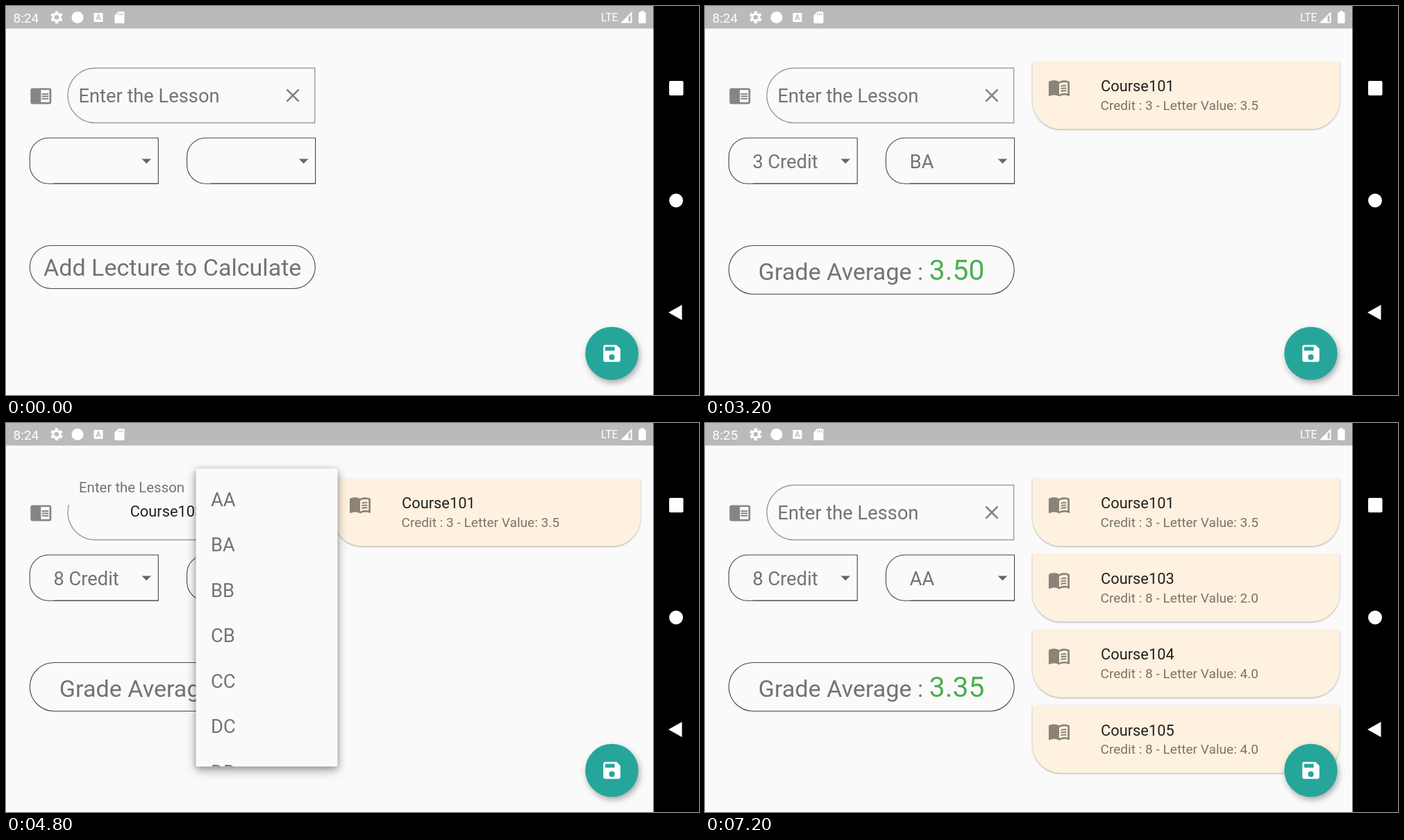
An HTML page for the animation above (8 s loop, 998x561 px).

```html
<!DOCTYPE html>
<html lang="en">
<head>
<meta charset="utf-8">
<title>Grade calculator</title>
<style>
html, body { margin: 0; width: 100%; height: 100%; overflow: hidden; background: #fafafa; }
svg { display: block; width: 998px; height: 561px; font-family: Roboto, sans-serif; }
.card { filter: drop-shadow(0 1px 1.2px rgba(0,0,0,.32)); }
.fab { filter: drop-shadow(2px 4px 4px rgba(0,0,0,.32)); }
.menu { filter: drop-shadow(0 1px 3px rgba(0,0,0,.2)) drop-shadow(0 5px 7px rgba(0,0,0,.36)); }
.key { filter: drop-shadow(0 1px 0.5px rgba(0,0,0,.3)); }
</style>
</head>
<body>
<svg id="stage" viewBox="0 0 998 561"></svg>
<script>
const STEP = 800;
const GREY = '#737373', DARK = '#212121', RED = '#d32f2f', ORANGE = '#ffa726', SLATE = '#55585d';
const DP = 1.364;

const course = (n, credit, value) => ({ title: 'Course' + n, credit, value });
const courses = [course(101, 3, '3.5'), course(103, 8, '2.0'), course(104, 8, '4.0'), course(105, 8, '4.0')];
const letters = ['AA', 'BA', 'BB', 'CB', 'CC', 'DC', 'DD'];
const credits = [1, 2, 3, 4, 5, 6, 7].map(n => n + ' Credit');

const scenes = [
  {},
  { fieldError: true, creditError: true, letterError: true },
  { name: 'Course101', creditError: true, letterError: true },
  { name: 'Course101', credit: 3, letterError: true },
  { credit: 3, letter: 'BA', cards: 1, average: '3.50' },
  { name: 'Course103', credit: 3, letter: 'BA', cards: 1, average: '3.50', menu: [47, 92.5, credits] },
  { name: 'Course103', credit: 8, letter: 'BA', cards: 1, average: '3.50', menu: [273.5, 110, letters] },
  { credit: 8, letter: 'AA', cards: 3, average: '3.08', late: true },
  { name: 'Physics', credit: 8, letter: 'AA', cards: 3, average: '3.08', late: true, typing: true },
  { credit: 8, letter: 'AA', cards: 4, average: '3.35', late: true }
];

const icons = {
  reader: 'M13 12h7v1.5h-7zm0-2.5h7V11h-7zm0 5h7V16h-7zM21 4H3c-1.1 0-2 .9-2 2v13c0 1.1.9 2 2 2h18c1.1 0 2-.9 2-2V6c0-1.1-.9-2-2-2zm0 15h-9V6h9v13z',
  book: 'M21 5c-1.1-.35-2.3-.5-3.5-.5-1.95 0-4.05.4-5.5 1.5-1.45-1.1-3.55-1.5-5.5-1.5S2.45 4.9 1 6v14.65c0 .3.4.6.75.45C3.1 20.45 5.05 20 6.5 20c1.95 0 4.05.4 5.5 1.5 1.35-.85 3.8-1.5 5.5-1.5 1.65 0 3.35.3 4.75 1.05.35.15.75-.15.75-.45V6c-.6-.45-1.25-.75-2-1zm0 13.5c-1.1-.35-2.3-.5-3.5-.5-1.7 0-4.15.65-5.5 1.5V8c1.35-.85 3.8-1.5 5.5-1.5 1.2 0 2.4.15 3.5.5zM13.8 9.9q3-1 5.8-.5v1.5q-3-.5-5.8.5zm0 2.7q3-1 5.8-.5v1.5q-3-.5-5.8.5zm0 2.7q3-1 5.8-.5v1.5q-3-.5-5.8.5z',
  save: 'M17 3H5c-1.1 0-2 .9-2 2v14c0 1.1.9 2 2 2h14c1.1 0 2-.9 2-2V7zm-5 16a3 3 0 1 1 0-6 3 3 0 0 1 0 6zm3-10H5V5h10z',
  close: 'M19 6.4L17.6 5 12 10.6 6.4 5 5 6.4l5.6 5.6L5 17.6 6.4 19l5.6-5.6 5.6 5.6 1.4-1.4-5.6-5.6z',
  arrow: 'M7 9.5l5 5 5-5z',
  mic: 'M12 14c1.66 0 3-1.34 3-3V5a3 3 0 0 0-6 0v6c0 1.66 1.34 3 3 3zm5-3a5 5 0 0 1-10 0H5c0 3.5 2.6 6.4 6 6.9V21h2v-3.1c3.4-.5 6-3.4 6-6.9z',
  palette: 'M12 2a10 10 0 0 0 0 20c1.4 0 2.5-1.1 2.5-2.5 0-.6-.2-1.2-.6-1.7-.3-.4 0-.8.4-.8H16c3.3 0 6-2.7 6-6 0-5-4.5-9-10-9z' +
    [[6.5, 12], [9.5, 8], [14.5, 8], [17.5, 12]].map(([x, y]) => `M${x - 1.5} ${y}a1.5 1.5 0 0 0 3 0a1.5 1.5 0 0 0-3 0z`).join('')
};

// Icons are drawn on a 24-unit grid centred on (x, y).
const icon = (name, x, y, fill, scale = DP) =>
  `<path d="${icons[name]}" fill="${fill}" fill-rule="evenodd" transform="translate(${x} ${y}) scale(${scale}) translate(-12 -12)"/>`;
const text = (x, y, size, fill, s, more = '') => `<text x="${x}" y="${y}" font-size="${size}" fill="${fill}" ${more}>${s}</text>`;
const mid = (x, y, size, fill, s, more = '') => text(x, y, size, fill, s, 'text-anchor="middle" ' + more);
const line = (d, stroke, width = 1, more = '') => `<path d="${d}" fill="none" stroke="${stroke}" stroke-width="${width}" ${more}/>`;
const rect = (x, y, w, h, fill, r = 0, more = '') => `<rect x="${x}" y="${y}" width="${w}" height="${h}" fill="${fill}" rx="${r}" ${more}/>`;
const circle = (x, y, r, fill, more = '') => `<circle cx="${x}" cy="${y}" r="${r}" fill="${fill}" ${more}/>`;
const gear = (x, y, fill, k) => `<g transform="translate(${x} ${y}) scale(${k})" fill="none" stroke="${fill}">
  <circle r="5.3" stroke-width="3.6"/><circle r="8" stroke-width="3.4" pathLength="12" stroke-dasharray="1.15 .85" stroke-dashoffset="-.42"/></g>`;

function statusBar(late) {
  return rect(0, 0, 933, 32.5, '#bababa') + text(10.5, 23.8, 19.1, '#fff', late ? '8:25' : '8:24') +
    gear(73, 16.3, '#fff', .92) + circle(103, 16.5, 8.5, '#fff') +
    rect(126.5, 10, 13, 13, '#fff', 1) + mid(133, 20.4, 10.5, '#bababa', 'A', 'font-weight="700"') +
    '<path d="M162 8h7q1.5 0 1.5 1.500v14q0 1.500-1.500 1.500h-11q-1.500 0-1.500-1.500V13.500z" fill="#fff"/>' +
    line('M162.300 10.500v3M165 10.500v3M167.700 10.500v3', '#bababa', 1.2) +
    text(857, 22, 15.6, '#fff', 'LTE') +
    '<path d="M885 24.500L901.500 8v16.500zM896.500 15.500v7h3v-10z" fill="#fff" fill-rule="evenodd"/>' +
    rect(911, 9, 10.5, 16, '#fff', 1.5) + rect(914, 7, 4.5, 3, '#fff');
}

function navBar(typing) {
  let out = rect(932.5, 0, 65.5, 561, '#000') + rect(955, 108, 20.5, 21, '#fff', 2) + circle(965, 280.5, 10, '#fff');
  if (!typing) return out + '<path d="M954 442l19.500-11v22z" fill="#fff"/>';
  out += '<path d="M954 434h22l-11 19.500z" fill="#fff"/>';
  for (const y of [33, 37]) out += line(`M955 ${y}h21`, '#fff', 2.2, 'stroke-dasharray="2.2 1.5"');
  return out + line('M959 42.500h13', '#fff', 2.2);
}

function field({ name, typing, fieldError }) {
  const accent = typing ? ORANGE : fieldError ? RED : '#9b9b9b';
  const mark = typing ? ORANGE : '#858585';
  const shape = name ? 'M90.600 118A39.500 39.500 0 0 0 128.500 168.500H444.700V89.500H292'
    : 'M444.700 89.500H128.500a39.500 39.500 0 0 0 0 79H444.700z';
  let out = line(shape, accent, typing ? 2.7 : 1.4) + icon('reader', 50.3, 129.3, mark) + icon('close', 413, 129, mark);
  out += name ? text(105, 100.3, 20.46, GREY, 'Enter the Lesson') + mid(231.5 + (typing ? 2 : 0), 135.3, 21.83, typing ? '#666' : DARK, name)
    : text(104.5, 139, 27.28, GREY, 'Enter the Lesson');
  if (typing) out += rect(232, 118, 3, 20.5, '#4b8df0', 1);
  if (fieldError) out += text(105, 195.500, 16.37, RED, 'Enter lesson');
  return out;
}

function dropdown(x, y, value, error) {
  const h = error ? 96 : 66;
  let out = line(`M${x + 185} ${y}H${x + 27}a27 27 0 0 0 -27 27v${h - 54}a27 27 0 0 0 27 27H${x + 185}z`, '#474747', 1.1) +
    line(`M${x + 34.500} ${y + 65.700}H${x + 185}`, error ? RED : '#555', error ? 1.5 : 1.2) +
    icon('arrow', x + 168, y + 33.500, '#666');
  if (value) out += text(x + 34.2, y + 43.4, 27.28, GREY, value);
  if (error) out += text(x + 34.2, y + 91.6, 16.37, RED, error);
  return out;
}

function form(s) {
  const top = 190.3 + (s.fieldError ? 30 : 0);
  const tall = s.creditError || s.letterError;
  const inset = error => tall && !error ? 15 : 0;
  const y = 345.5 + (s.fieldError ? 30 : 0) + (tall ? 30 : 0);
  const h = s.average ? 70 : 62;
  return field(s) +
    dropdown(34.3, top + inset(s.creditError), s.credit && s.credit + ' Credit', s.creditError && 'Select credit') +
    dropdown(260.6, top + inset(s.letterError), s.letter, s.letterError && 'Select letter') +
    rect(34.3, y, 411, h, 'none', h / 2, 'stroke="#474747" stroke-width="1.1"') +
    (s.average
      ? mid(239.7, y + 49.5, 34.1, GREY, `Grade Average : <tspan font-size="40.9" fill="#4caf50">${s.average}</tspan>`)
      : mid(239.7, y + 43, 34.1, GREY, 'Add Lecture to Calculate'));
}

function card({ title, credit, value }, i) {
  return `<g transform="translate(0 ${i * 109.100})">
    <path class="card" d="M471.500 80H914v56.500a41 41 0 0 1-41 41H512.500a41 41 0 0 1-41-41z" fill="#fff1df"/>` +
    icon('book', 510, 117.5, '#8b8378') + text(570, 123.3, 21.83, DARK, title) +
    text(569.5, 150, 19.1, '#7a736a', `Credit : ${credit} - Letter Value: ${value}`) + '</g>';
}

function menu([x, y, items]) {
  return rect(x, 65.5, 204, 430, '#fafafa', 2.7, 'class="menu"') +
    '<clipPath id="menuClip"><rect y="65.500" width="998" height="430"/></clipPath><g clip-path="url(#menuClip)">' +
    items.map((s, i) => text(x + 21.5, y + 9.8 + i * 65.45, 27.28, GREY, s)).join('') + '</g>';
}

function keyboard() {
  const PITCH = 93.2;
  const key = (x, y, w = 86, fill = '#fcfdfd', h = 48.500) => rect(x, y, w, h, fill, 7, 'class="key"');
  const row = (chars, x, y) => [...chars].map((c, i) =>
    key(x + i * PITCH, y) + mid(x + 43 + i * PITCH, y + 34.4, 31.5, '#111', c)).join('');
  const GRAY = '#cbced6';
  let out = rect(0, 267, 932.5, 294, '#e9ebef');
  out += circle(37, 298, 20.5, '#fff', 'class="key"') + line('M40.500 291.500l-6.500 6.500 6.500 6.500', '#333', 2.4) +
    line('M150 287.500h15.500q2.500 0 2.500 2.500v11l-7 7.500h-11q-2.500 0-2.500-2.500v-16q0-2.500 2.500-2.500zM168 301h-5q-2 0-2 2v5M152.500 298.500q4 6 9 0', SLATE, 2.2) +
    circle(154, 294, 1.5, SLATE) + circle(161.5, 294, 1.5, SLATE) +
    mid(276.5, 304, 17.5, SLATE, 'GIF', 'font-weight="900"') +
    rect(388, 289, 18, 21, 'none', 1.5, `stroke="${SLATE}" stroke-width="2.4"`) + rect(391.5, 286, 11, 6, SLATE, 1) +
    line('M391.500 296h11M391.500 300.500h11M391.500 305h7', SLATE, 2) +
    gear(517, 298.500, SLATE, 1.28) + icon('palette', 637, 298.500, SLATE, 1.2) + line('M705 283v31', '#cfd1d5') +
    [766, 774, 782].map(x => circle(x, 298.500, 2.4, SLATE)).join('') + icon('mic', 895, 298.500, SLATE, 1.4);
  out += row('qwertyuiop', 4, 334) + row('asdfghjkl', 50.600, 393) + row('zxcvbnm', 143.500, 452);
  for (let i = 0; i < 10; i++) out += mid(74 + i * PITCH, 350, 14.5, '#6a6d72', (i + 1) % 10, 'font-weight="500"');
  out += key(4, 452, 132, GRAY) + line('M69.500 463l14 14h-7v12h-14v-12h-7z', '#3c4043', 2.4, 'stroke-linejoin="round"') +
    key(796, 452, 132, GRAY) + line('M856 465.500h22v24H856l-10-12zM860.500 472l11 11m0-11l-11 11', '#3c4043', 2.5);
  const low = (x, w, fill) => key(x, 511, w, fill, 45.5);
  return out + low(4, 132, GRAY) + mid(69.500, 542, 24.3, '#3c4043', '?123', 'font-weight="500"') +
    low(143.500, 86, GRAY) + mid(186.500, 542, 27, '#222', ',') + low(236.500, 86) +
    circle(279.500, 533.500, 12.7, 'none', 'stroke="#3c4043" stroke-width="2.4"') + circle(275, 530, 1.9, '#3c4043') +
    circle(284, 530, 1.9, '#3c4043') + line('M273 536.500q6.500 8 13 0', '#3c4043', 2.2) +
    low(329.500, 366) + low(703, 86, GRAY) + mid(745.500, 542, 27, '#222', '.') +
    low(796, 132, '#1a73e8') + line('M851 534l7 7 15-15', '#fff', 2.6);
}

function draw(s) {
  const floor = s.typing ? 257 : 561;
  const fabY = s.typing ? 210 : 501;
  return rect(0, 0, 998, 561, '#fafafa') +
    `<clipPath id="body"><rect width="933" height="${floor}"/></clipPath><g clip-path="url(#body)">` +
    form(s) + courses.slice(0, s.cards || 0).map(card).join('') + '</g>' +
    circle(872.5, fabY, 38.3, '#26a69a', 'class="fab"') + icon('save', 872.5, fabY, '#fff') +
    (s.menu ? menu(s.menu) : '') + (s.typing ? keyboard() : '') + statusBar(s.late) + navBar(s.typing);
}

const stage = document.getElementById('stage');
let shown = -1;
function tick() {
  const now = Math.floor(performance.now() / STEP) % scenes.length;
  if (now !== shown) stage.innerHTML = draw(scenes[shown = now]);
  requestAnimationFrame(tick);
}
tick();
</script>
</body>
</html>
```
